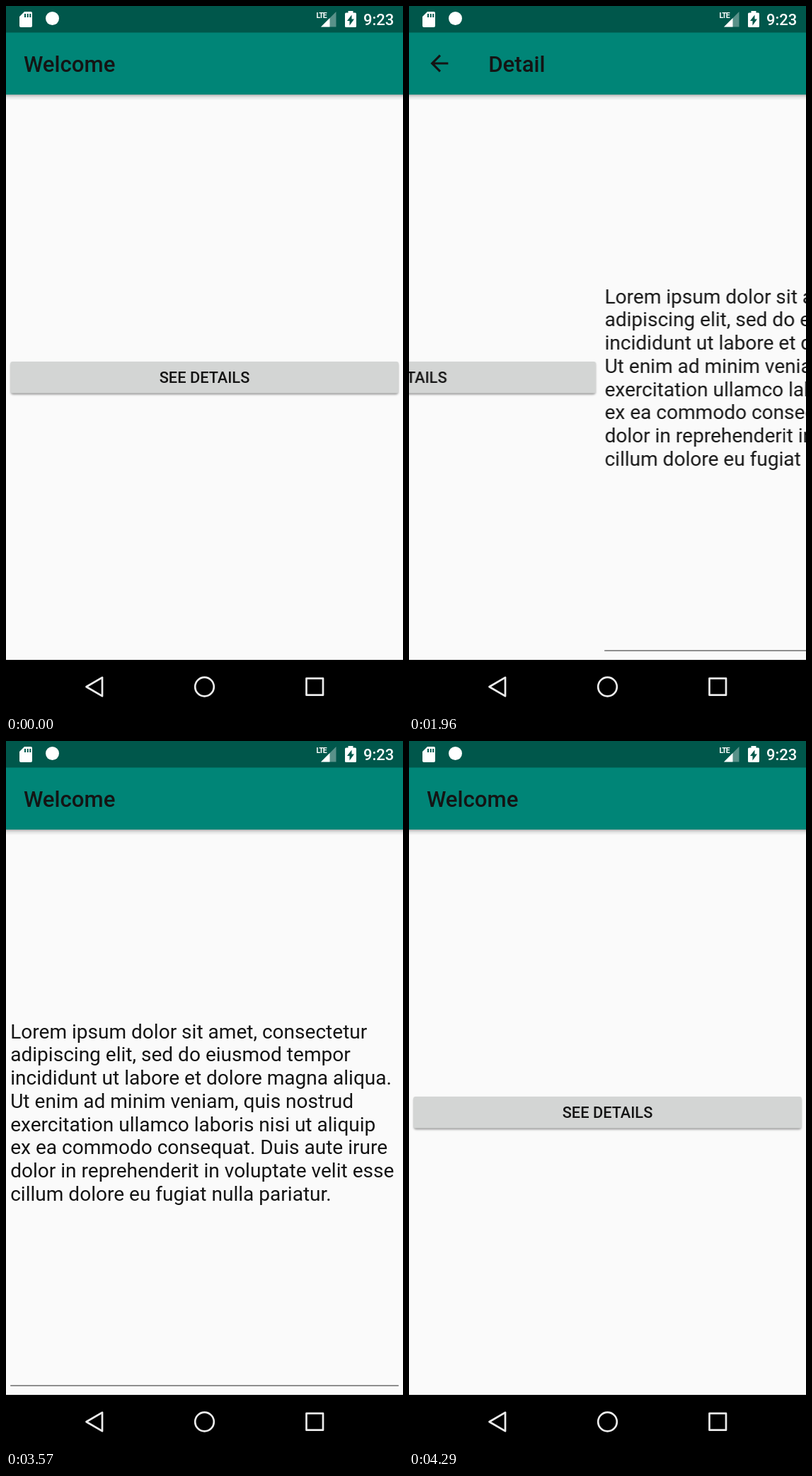
Recreate the animation shown at these times as an HTML page. Size 561 by 998 pixels, loop 4860 ms.

```html
<!DOCTYPE html>
<html lang="en">
<head>
<meta charset="utf-8">
<title>Screen slide</title>
<style>
  html, body { margin: 0; width: 100%; height: 100%; overflow: hidden; background: #fafafa; }
  svg { display: block; width: 100%; height: 100%; font-family: Roboto, sans-serif; }
  .medium { font-weight: 500; }
  .ink { fill: #141414; }

  .pages { animation: slide 4860ms infinite; }
  .home { animation: home 4860ms step-end infinite; }
  .detail { animation: detail 4860ms step-end infinite; }

  @keyframes slide {
    0% { transform: translateX(0); }
    32.984% { transform: translateX(0); animation-timing-function: cubic-bezier(.37, 0, .63, 1); }
    47.387% { transform: translateX(-561px); }
    73.868% { transform: translateX(-561px); animation-timing-function: cubic-bezier(.37, 0, .63, 1); }
    88.272%, 100% { transform: translateX(0); }
  }
  @keyframes home {
    0% { opacity: 1; }
    32.9% { opacity: 0; }
    73.4%, 100% { opacity: 1; }
  }
  @keyframes detail {
    0% { opacity: 0; }
    32.9% { opacity: 1; }
    73.4%, 100% { opacity: 0; }
  }
</style>
</head>
<body>
<svg viewBox="0 0 561 998" preserveAspectRatio="none">
  <defs>
    <linearGradient id="shade" x2="0" y2="1">
      <stop offset="0" stop-opacity=".3"/>
      <stop offset=".4" stop-opacity=".1"/>
      <stop offset="1" stop-opacity="0"/>
    </linearGradient>
    <filter id="soft" x="-5%" y="-30%" width="110%" height="160%">
      <feGaussianBlur stdDeviation="1.5"/>
    </filter>
  </defs>

  <rect width="561" height="998" fill="#fafafa"/>

  <g class="pages">
    <rect x="7" y="504" width="547" height="44.3" rx="3" fill-opacity=".42" filter="url(#soft)"/>
    <rect x="6.2" y="502" width="548.6" height="44.5" rx="3" fill="#d3d5d4"/>
    <text class="medium ink" x="280.5" y="532.3" font-size="21.8" text-anchor="middle">SEE DETAILS</text>

    <g transform="translate(561 0)">
      <g class="ink" font-size="28.05">
        <text x="6.2" y="419.7">Lorem ipsum dolor sit amet, consectetur</text>
        <text x="6.2" y="452.4">adipiscing elit, sed do eiusmod tempor</text>
        <text x="6.2" y="485.2">incididunt ut labore et dolore magna aliqua.</text>
        <text x="6.2" y="517.9">Ut enim ad minim veniam, quis nostrud</text>
        <text x="6.2" y="550.7">exercitation ullamco laboris nisi ut aliquip</text>
        <text x="6.2" y="583.4">ex ea commodo consequat. Duis aute irure</text>
        <text x="6.2" y="616.2">dolor in reprehenderit in voluptate velit esse</text>
        <text x="6.2" y="648.9">cillum dolore eu fugiat nulla pariatur.</text>
      </g>
      <rect x="6.2" y="909.2" width="548.6" height="1.5" fill="#6c6c6c"/>
    </g>
  </g>

  <!-- App bar -->
  <rect y="125" width="561" height="8" fill="url(#shade)"/>
  <rect y="37" width="561" height="88" fill="#008577"/>
  <g class="medium ink" font-size="31.17">
    <text class="home" x="24.9" y="93">Welcome</text>
    <g class="detail">
      <path transform="translate(24.2 62.3) scale(1.558)"
            d="M20 11H7.83l5.59-5.59L12 4l-8 8 8 8 1.41-1.41L7.83 13H20z"/>
      <text x="112.2" y="93">Detail</text>
    </g>
  </g>

  <!-- Status bar -->
  <rect width="561" height="37.5" fill="#00574b"/>
  <g fill="#fff">
    <path d="M26 8h9q2 0 2 2v18q0 2-2 2H21q-2 0-2-2V15z"/>
    <path d="M27 11v5M30.7 11v5M34.3 11v5" stroke="#00574b" stroke-width="2"/>
    <circle cx="65.5" cy="17.5" r="9.5"/>
    <text x="438.5" y="17" font-size="10.5" font-weight="700" letter-spacing="-1">LTE</text>
    <path d="M445 29.5L466.5 8v21.5z" fill-opacity=".35"/>
    <path d="M445 29.5L457.5 17v12.5z"/>
    <path d="M483.5 7h7v2.5h3q1.5 0 1.5 1.5v17.500q0 1.500-1.500 1.500h-13q-1.500 0-1.500-1.500V11q0-1.500 1.500-1.500h3z"/>
    <path d="M488.500 12.500v6h3.500l-6.500 9v-6.500h-3.500z" fill="#00574b"/>
    <text class="medium" x="505" y="27.300" font-size="22">9:23</text>
  </g>

  <!-- Navigation bar -->
  <rect y="923" width="561" height="75" fill="#000"/>
  <g fill="none" stroke="#ececec" stroke-width="2.7" stroke-linejoin="round">
    <path d="M113.500 961L136 947.800v26.400z"/>
    <circle cx="280.500" cy="961" r="13.300"/>
    <rect x="424.500" y="949.200" width="23.500" height="23.500"/>
  </g>
</svg>
</body>
</html>
```
